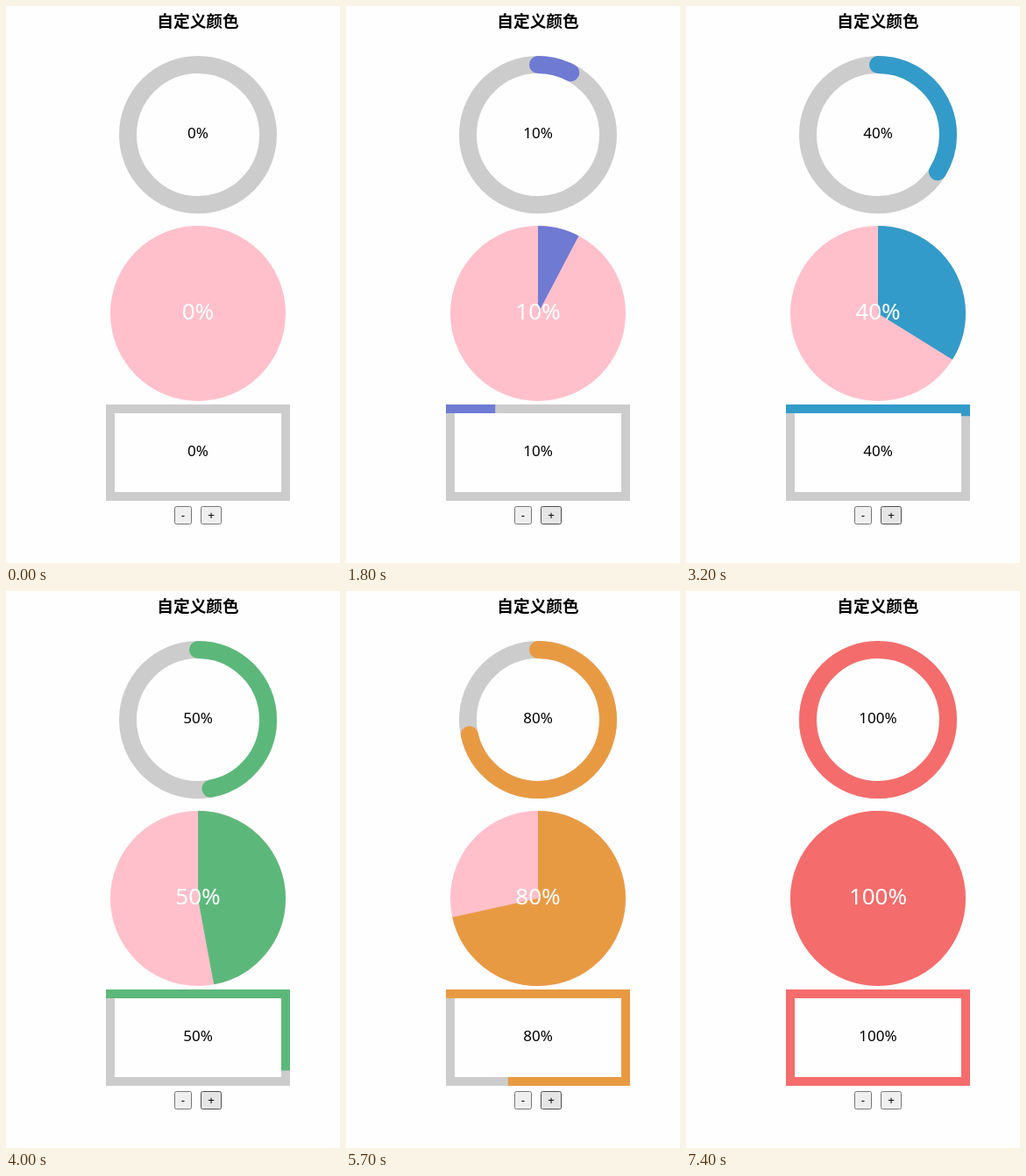
Recreate the animation shown at these times as an HTML page. Size 381 by 636 pixels, loop 8.5 s.

```html
<!DOCTYPE html>
<html lang="zh">
<head>
<meta charset="utf-8">
<title>自定义颜色</title>
<style>
  html, body { margin: 0; width: 100%; height: 100%; overflow: hidden; background: #fefefe; }
  svg { display: block; }
  text { font-family: "Noto Sans", "Open Sans", sans-serif; text-anchor: middle; }
  .title { font: bold 18.72px "Noto Sans CJK SC", "Noto Sans CJK", sans-serif; }
  .label { font-size: 17px; }
  .label.big { font-size: 26px; fill: #fff; }
  .shape { fill: none; stroke: #ccc; }
  .ring { stroke-width: 20; }
  .pie { stroke-width: 100; }
  .box { stroke-width: 10; }
  .ring.bar { stroke-linecap: round; }
  .box.bar { stroke-linecap: square; }
  .pie.track { stroke: pink; }
  .button rect { fill: #efefef; stroke: #767676; }
  .button.hover rect { fill: #e5e5e5; stroke: #4f4f4f; }
  .button.active rect { fill: #f5f5f5; stroke: #8d8d8d; }
  .button text { font-size: 13.33px; }
</style>
</head>
<body>
<svg width="381" height="636" viewBox="0 0 381 636">
  <text class="title" x="219" y="24">自定义颜色</text>

  <circle class="shape ring track" cx="219" cy="147" r="80"/>
  <circle class="shape ring bar" cx="219" cy="147" r="80" pathLength="100" transform="rotate(-90 219 147)"/>
  <text class="label" x="219" y="151"></text>

  <circle class="shape pie track" cx="219" cy="351" r="50"/>
  <circle class="shape pie bar" cx="219" cy="351" r="50" pathLength="100" transform="rotate(-90 219 351)"/>
  <text class="label big" x="219" y="358"></text>

  <rect class="shape box track" x="119" y="460" width="200" height="100"/>
  <path class="shape box bar" d="M119 460H319V560H119V460" pathLength="100"/>
  <text class="label" x="219" y="514"></text>

  <g class="button">
    <rect x="192.5" y="571.5" width="19" height="20" rx="2"/>
    <text x="202" y="586">-</text>
  </g>
  <g class="button" id="plus">
    <rect x="222.5" y="571.5" width="23" height="20" rx="2"/>
    <text x="234" y="586">+</text>
  </g>
</svg>
<script>
const LOOP = 8500, TICK = 100, TRANSITION = 500, PRESS = 70;
const HOVER_START = 1100, HOVER_END = 7400;
const clicks = [1565, 2040, 2512, 3080, 3790, 4565, 5100, 5633, 6130, 6570];
// One colour per 20 % band
const colors = [[111, 122, 211], [25, 137, 250], [92, 184, 122], [230, 162, 60], [245, 108, 108]];

const bars = document.querySelectorAll('.bar');
const labels = document.querySelectorAll('.label');
const plus = document.getElementById('plus');

// CSS "ease": cubic-bezier(.25, .1, .25, 1)
function ease(x) {
  if (x <= 0) return 0;
  if (x >= 1) return 1;
  const bezier = (u, a, b) => 3 * u * (1 - u) ** 2 * a + 3 * u * u * (1 - u) * b + u ** 3;
  let low = 0, high = 1;
  for (let i = 0; i < 24; i++) {
    const mid = (low + high) / 2;
    if (bezier(mid, .25, .25) < x) low = mid; else high = mid;
  }
  return bezier(low, .1, 1);
}

function render(time) {
  const progress = clicks.map(start => ease((time - start) / TRANSITION));
  const level = progress.reduce((sum, p) => sum + p * 10, 0);
  const percent = clicks.filter(start => time >= start).length * 10;

  // Every second click enters the next colour band
  let color = colors[0];
  for (let band = 1; band < colors.length; band++) {
    const p = progress[band * 2 - 1];
    color = color.map((c, i) => c + (colors[band][i] - c) * p);
  }

  for (const bar of bars) {
    bar.style.opacity = percent ? 1 : 0;
    bar.style.stroke = `rgb(${color.map(Math.round)})`;
    bar.style.strokeDasharray = `${level} 200`;
  }
  for (const label of labels) label.textContent = percent + '%';

  plus.classList.toggle('hover', time >= HOVER_START && time < HOVER_END);
  plus.classList.toggle('active', clicks.some(c => time >= c - PRESS && time < c));
}

function frame() {
  const time = performance.now() % LOOP;
  render(Math.floor(time / TICK) * TICK);
  requestAnimationFrame(frame);
}
frame();
</script>
</body>
</html>
```
